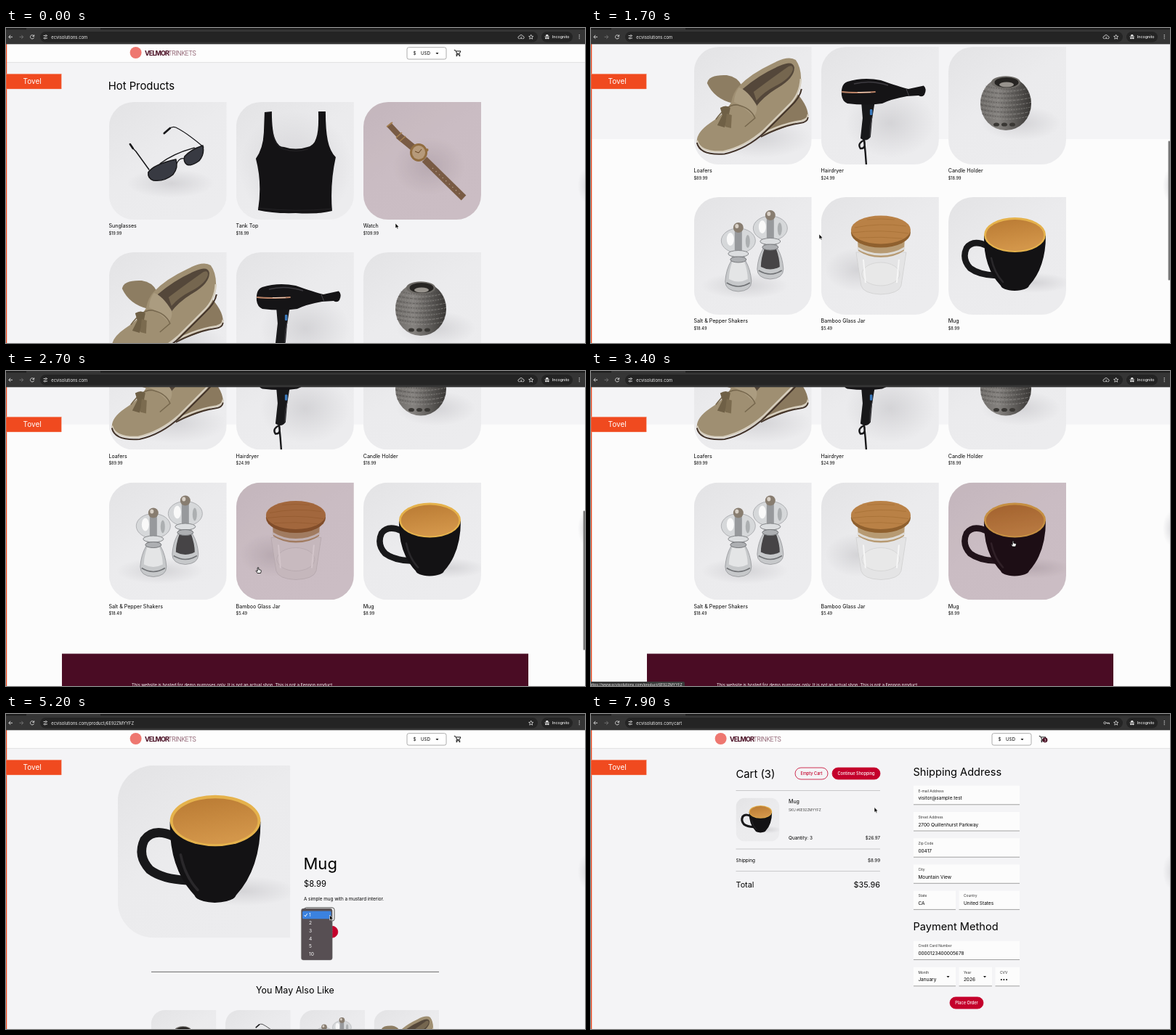
These frames come from a looping animation (797 px wide and 434 px high, 8 s). An HTML page:

```html
<!DOCTYPE html>
<html lang="en">
<head>
<meta charset="utf-8">
<title>Shop walkthrough</title>
<style>
html, body { margin: 0; width: 100%; height: 100%; overflow: hidden; background: #f4f4f6; }
svg { display: block; width: 797px; height: 434px; }
text { font-family: Inter, "Open Sans", sans-serif; white-space: pre; }
</style>
</head>
<body>
<svg id="stage" viewBox="0 0 797 434"></svg>
<script>
const INK = '#111', RED = '#c4002b', ORANGE = '#f04a1f', DARK = '#18181a';
const SITE = 'ecvisolutions.com', MUG_PATH = '/product/6E92ZMYYFZ', JAR_PATH = '/product/9SIQT8TOJO';

// Markup helpers
const text = (x, y, size, s, attrs = '') => `<text x="${x}" y="${y}" font-size="${size}" ${attrs}>${s}</text>`;
const rect = (x, y, w, h, fill, attrs = '') => `<rect x="${x}" y="${y}" width="${w}" height="${h}" fill="${fill}" ${attrs}/>`;
const oval = (x, y, rx, ry, fill, attrs = '') => `<ellipse cx="${x}" cy="${y}" rx="${rx}" ry="${ry}" fill="${fill}" ${attrs}/>`;
const fill = (d, color, attrs = '') => `<path d="${d}" fill="${color}" ${attrs}/>`;
const line = (d, color, width = 1, attrs = '') => `<path d="${d}" fill="none" stroke="${color}" stroke-width="${width}" ${attrs}/>`;
const group = (id, body, attrs = '') => `<g id="${id}" ${attrs}>${body}</g>`;
const caret = (x, y) => fill(`M${x - 2} ${y - 1}h4l-2 2.2z`, INK);
const rule = (x1, x2, y, color) => line(`M${x1} ${y}H${x2}`, color, .8);
const pill = (x, y, w, label, solid = true) =>
  rect(x, y, w, 16, solid ? RED : 'none', `rx="8" stroke="${RED}" stroke-width=".8"`) +
  text(x + w / 2, y + 10, 5.6, label, `text-anchor="middle" font-weight="500" fill="${solid ? '#fff' : RED}"`);
const END = 'text-anchor="end"', ROUND = 'stroke-linecap="round" stroke-linejoin="round"';

// Product pictures, each on a 162 unit square
const shadow = (x, y, rx, ry) => oval(x, y, rx, ry, 'url(#shade)');
const shaker = (x, y, filling) =>
  rect(x - 9, y + 32, 18, 18, '#b2b4b7') +
  fill(`M${x - 10} ${y + 46}Q${x - 17} ${y + 58} ${x - 18} ${y + 74}Q${x - 18} ${y + 87} ${x} ${y + 88}Q${x + 18} ${y + 87} ${x + 18} ${y + 74}Q${x + 17} ${y + 58} ${x + 10} ${y + 46}Z`, '#c6c8ca', 'stroke="#929497" stroke-width=".8"') +
  fill(`M${x - 8} ${y + 46}Q${x - 13} ${y + 60} ${x - 13} ${y + 71}Q${x} ${y + 78} ${x + 13} ${y + 71}Q${x + 13} ${y + 60} ${x + 8} ${y + 46}Z`, filling) +
  line(`M${x - 16} ${y + 76}Q${x} ${y + 86} ${x + 16} ${y + 76}`, '#6f7174', 1.6) +
  oval(x, y + 18, 23.5, 17, '#d6d8da', 'stroke="#a2a4a7" stroke-width=".8"') +
  oval(x - 11, y + 16, 5, 9, '#fff', 'opacity=".85"') + oval(x + 13, y + 19, 3, 9, '#929497', 'opacity=".6"') +
  rect(x - 5, y + 3, 10, 30, '#77797b', 'opacity=".65"') +
  oval(x, y + 36, 14, 4.5, '#dcdee0', 'stroke="#85878a"') + oval(x, y + 44, 11, 4, '#adafb2', 'stroke="#77797c"') +
  oval(x, y, 7, 7, '#887d70') + oval(x - 2, y - 2, 2.5, 3, '#d8d0c6');

const lensEdge = `stroke="${DARK}" stroke-width="1.5"`;
const products = {
  glasses: shadow(85, 112, 60, 20) +
    line('M55 93L37 68Q31 62 29 58', DARK, 1.5, ROUND) + line('M29 58l4 6', DARK, 2.6, ROUND) +
    line('M130 62Q108 43 92 35Q87 33 83 37', DARK, 1.3, ROUND) + line('M84 36l-8 7', DARK, 2.8, ROUND) +
    fill('M54 97Q61 86 92 79Q96 90 88 100Q76 110 61 108Q53 105 54 97Z', '#383a42', lensEdge) +
    fill('M104 75Q113 65 129 60Q132 72 124 81Q113 89 107 86Q102 82 104 75Z', '#383a42', lensEdge) +
    line('M93 85Q97 76 104 78M70 85Q90 70 118 63', DARK, 1.3),
  tank: shadow(82, 90, 78, 78) +
    fill('M39 14L49 13Q49 42 54 52Q58 62 66 62Q82 67 98 62Q107 60 110 50Q114 40 113 13L123 13Q123 38 126 53Q129 68 137 76Q129 112 132 150Q112 155 82 153Q52 154 30 149Q36 112 27 78Q37 64 38 42Z', '#141315') +
    line('M30 146Q82 152 132 147M50 42Q54 62 65 65Q82 70 99 65', '#2c2a2d', .7),
  watch: shadow(90, 88, 50, 40) +
    line('M35 31L49 46', '#85724f', 8) + line('M48 46L70 64', '#85724f', 9.5) +
    line('M84 79L138 132', '#85724f', 9.5) +
    line('M32 34l8-6M45 49l8-7M50 54l8-7', '#bfa15f', 1.6) +
    line('M95 91L133 127', '#d3c5aa', 1.3, 'stroke-dasharray="1.3 5"') +
    oval(76, 69.5, 12, 12.5, '#a4884a') + oval(76, 69.5, 9, 9.5, '#d2c092') +
    line('M76 70l4-5M76 70l-5-2', '#6c5426') + oval(88, 66, 1.5, 2, '#a98a45'),
  loafers: shadow(90, 125, 72, 28) +
    fill('M18 50Q20 38 45 39Q60 41 66 54L54 78Q28 72 18 50Z', '#8d7d62') +
    fill('M136 58Q158 80 157 97Q130 110 94 122L84 106Z', '#8a795e') +
    line('M157 93Q157 100 148 102Q120 106 92 121', '#d6cebe', 2.5) + line('M157 97Q156 104 146 105Q120 109 92 124', '#43342a', 1.8) +
    fill('M62 54Q78 37 108 23Q130 11 140 18Q149 30 147 52Q142 69 130 81L96 116Q70 139 40 145Q10 146 4 131Q3 118 22 105Q44 91 51 77Q54 62 62 54Z', '#9f8f72') +
    line('M4 129Q8 146 40 144.500Q70 138 96 115L130 81Q146 66 147 44', '#d6cebe', 2.5) +
    line('M4 132Q8 150 42 147.500Q72 141 98 117L132 83Q146 70 148 58', '#43342a', 2) +
    fill('M67 58Q90 38 118 26Q136 18 138 28Q139 42 116 56Q96 68 84 84Q72 70 67 58Z', '#54473a') +
    fill('M82 62Q106 44 130 27Q137 24 136 32Q132 44 112 54Q96 62 86 74Z', '#75664f') +
    fill('M62 56Q74 60 86 80Q88 90 82 96Q66 80 55 76Q56 63 62 56Z', '#ab9c80') +
    line('M30 100Q46 78 60 80Q78 84 84 98L70 110', '#77684e', 1.6) +
    fill('M36 84q8-5 14 0l-2 10-6 17-10-3 7-14z', '#6f6046') + fill('M45 92l7 2-1 18-8-2z', '#7b6b4f'),
  dryer: shadow(95, 105, 62, 48) +
    line('M60 128Q49 133 54 140Q62 141 59 128Q61 146 62 162', DARK, 2.4) +
    fill('M55 74L74 74L70 100L68 124Q62 132 54 126L57 98Z', DARK) +
    fill('M28 66Q27 51 36 48Q58 41 82 46Q108 55 120 58L141 53.500Q146 58 142 66Q139 70 134 67L118 68Q96 72 84 78Q62 81 36 78Q29 75 28 66Z', '#151416') +
    line('M117 58l4 10', '#47454a', 1) + line('M45 51Q68 45 92 53', '#3d3b40', 1.5) +
    line('M29 62Q45 64 74 62', '#b98266', 2, ROUND) + line('M50 62.5h18', '#efd0ba', 1.2) +
    rect(67, 86, 3.5, 8, '#3978bb', 'rx="1"') + line('M70 97Q67 110 67 124', '#49474c', 1),
  candle: shadow(100, 105, 55, 24) +
    oval(79, 78, 35, 37, 'url(#metal)') +
    Array.from({length: 14}, (_, i) => {
      const y = 54 + i * 3.2, w = 35 * Math.sqrt(1 - ((y - 78) / 39) ** 2);
      return line(`M${79 - w} ${y}Q79 ${y + 8} ${79 + w} ${y}`, i % 2 ? '#a19e9b' : '#403e3c', 1, `stroke-dasharray="${2 + i % 3} 1.5" opacity=".55"`);
    }).join('') +
    [66, 77, 88].map(x => oval(x, 107, 4, 2.6, '#393734')).join('') +
    oval(79, 49, 20, 8.8, '#6d6a66') + oval(80, 49, 16.5, 7, '#262422') + oval(80, 52, 10, 3.5, '#97938d'),
  shakers: shadow(70, 122, 60, 18) + shaker(105, 25, '#464446') + shaker(61, 42, '#e4e5e6'),
  jar: shadow(50, 100, 45, 30) +
    fill('M48 76L55 122Q58 133 82 134Q107 133 110 122L117 76Z', '#e4e4e5', 'stroke="#d0d0d0" stroke-width=".8"') +
    oval(82, 106, 26, 16, '#e8e8e8', 'stroke="#d2d2d2" stroke-width=".8"') + line('M58 86l3 32M107 86l-3 32', '#f6f6f6', 2) +
    fill('M50 58L51 74Q64 83 82 83Q101 83 114 74L115 58Z', '#b79a72') + line('M50 70Q64 79 82 79Q101 79 115 70', '#dedbd6', 3) +
    oval(82, 49, 41, 20.5, '#8f602e') + oval(82, 45, 41, 19.5, '#b98146') +
    line('M46 42Q80 35 117 40M43 49Q80 44 120 50M52 56Q82 54 112 57M63 31Q82 29 101 31', '#a87137', .8),
  mug: shadow(118, 118, 50, 14) +
    line('M53 67Q34 58 25 70Q18 85 30 98Q42 107 65 108', DARK, 8.5) +
    fill('M49 53Q48 97 72 122Q74 128 91 129Q109 128 111 122Q134 97 134 53Z', '#131214') +
    line('M59 84Q63 104 75 117', '#343236', 2.5, ROUND + ' opacity=".7"') +
    oval(91.5, 52, 42.5, 24, '#e5b24c') + oval(91.5, 52.5, 39.8, 21.5, 'url(#mustard)')
};

const photo = (name, x, y, size, clip = 'card') =>
  `<g transform="translate(${x} ${y}) scale(${size / 162})" clip-path="url(#${clip})">${rect(0, 0, 162, 162, 'url(#wall)')}${products[name]}</g>`;

const defs = `<defs>
<linearGradient id="wall" x2=".7" y2="1"><stop stop-color="#e3e3e5"/><stop offset=".5" stop-color="#ebebed"/><stop offset="1" stop-color="#ececee"/></linearGradient>
<radialGradient id="shade"><stop stop-color="#77757c" stop-opacity=".2"/><stop offset="1" stop-color="#77757c" stop-opacity="0"/></radialGradient>
<radialGradient id="edge"><stop stop-color="#dddde0"/><stop offset="1" stop-color="#dddde0" stop-opacity="0"/></radialGradient>
<linearGradient id="metal"><stop stop-color="#6f6c69"/><stop offset=".35" stop-color="#85827f"/><stop offset="1" stop-color="#383634"/></linearGradient>
<linearGradient id="mustard" x2=".3" y2="1"><stop stop-color="#b97a33"/><stop offset="1" stop-color="#d3964a"/></linearGradient>
<clipPath id="card"><path d="M34 0H162V128A34 34 0 0 1 128 162H34A34 34 0 0 1 0 128V34A34 34 0 0 1 34 0Z"/></clipPath>
<clipPath id="half"><path d="M34 0H162V162H34A34 34 0 0 1 0 128V34A34 34 0 0 1 34 0Z"/></clipPath>
<clipPath id="round"><rect width="162" height="162" rx="34"/></clipPath>
<clipPath id="view"><rect y="22" width="797" height="412"/></clipPath></defs>`;

const cartIcon = line('M616.8 30.5h1.6l2.6 4.8h3.2l1.7-3.4h-6.4M620.6 35.3l-.8 1.5h5.4', INK, 1) + oval(620.4, 38.2, .9, .9, INK) + oval(624.4, 38.2, .9, .9, INK);
const shopHeader = rect(0, 22, 797, 25, '#fdfdfd') + rule(0, 797, 47.4, '#dcdcde') +
  oval(178.6, 34, 8, 8, '#ee7770') +
  text(191, 38, 9, 'VELMOR', 'font-weight="700" letter-spacing="-.9" fill="#470b20"') +
  text(223, 38, 9, 'TRINKETS', 'font-weight="300" letter-spacing="-.6" fill="#7c4658"') +
  rect(552, 26.7, 54, 16.3, '#fff', 'rx="2.5" stroke="#999" stroke-width=".8"') +
  text(560.5, 37.2, 6.2, '$') + text(571, 37.2, 6.2, 'USD') + caret(593.5, 35) + cartIcon +
  group('badge', oval(625, 35.8, 3.4, 3.4, '#470b20') + text(625, 37.6, 5, '3', 'fill="#fff" text-anchor="middle"'));

const catalog = [
  ['glasses', 'Sunglasses', 19.99], ['tank', 'Tank Top', 18.99], ['watch', 'Watch', 109.99],
  ['loafers', 'Loafers', 89.99], ['dryer', 'Hairdryer', 24.99], ['candle', 'Candle Holder', 18.99],
  ['shakers', 'Salt &amp; Pepper Shakers', 18.49], ['jar', 'Bamboo Glass Jar', 5.49], ['mug', 'Mug', 8.99]
];
const homePage = rect(0, 436, 797, 500, '#fcfcfc') + text(140.8, 84.9, 14.8, 'Hot Products') +
  catalog.map(([name, label, price], i) => {
    const x = 141.8 + i % 3 * 175.1, y = 102 + Math.floor(i / 3) * 207;
    return photo(name, x, y, 162) +
      `<g transform="translate(${x} ${y})">` +
      rect(0, 0, 162, 162, '#47001d', `id="tint-${name}" opacity=".2" clip-path="url(#card)"`) +
      text(-.3, 173, 7.1, label) + text(-.3, 182.6, 5.6, '$' + price) + '</g>';
  }).join('') +
  rect(77, 752, 642, 200, '#4a0c24') +
  text(173, 797, 5.85, 'This website is hosted for demo purposes only. It is not an actual shop. This is not a Fennop product.', 'fill="#fff"');

const productPage = photo('mug', 153.8, 70.7, 237.7, 'half') +
  text(409.5, 213.5, 22, 'Mug') + text(410, 238.3, 11.2, '$8.99') +
  text(410, 257, 6.3, 'A simple mug with a mustard interior.') +
  rect(410.4, 266.8, 41.6, 18.4, '#fdfdfd', 'id="select" rx="3" stroke="#999" stroke-width=".8"') +
  text(417, 278.5, 6.4, '1', 'id="quantity"') + caret(439.5, 276) +
  pill(410.4, 292.2, 46.4, 'Add To Cart') + rule(200, 596, 355.3, '#444') +
  text(398, 384.8, 12.5, 'You May Also Like', 'text-anchor="middle"') +
  ['candle', 'glasses', 'shakers', 'loafers'].map((name, i) => photo(name, 199.8 + i * 102.2, 408, 89.8)).join('') +
  group('menu', rect(406.4, 268, 42.8, 71, '#574f53', 'rx="3" stroke="#777" stroke-width=".4"') +
    rect(408, 271.4, 39.6, 10.8, '#3b82e0', 'id="row" rx="1.5"') +
    line('M410.6 277l1.5 2 2.6-4', '#fff', .9) +
    [1, 2, 3, 4, 5, 10].map((n, i) => text(417, 279.2 + i * 10.8, 6.6, n, 'fill="#fff"')).join(''));

const field = (x, y, w, label, value) => rect(x, y, w, 26, '#fcfcfc') + rule(x, x + w, y + 26, '#8b8b8b') +
  text(x + 6.4, y + 8.8, 4.9, label, 'fill="#333"') + text(x + 6.4, y + 19.5, 6.5, value);
const cartPage = text(199.5, 88.3, 14.8, 'Cart (3)') + pill(281, 74, 45, 'Empty Cart', false) + pill(332, 74, 66, 'Continue Shopping') +
  [105.5, 186, 216.6].map(y => rule(199.5, 398, y, '#bcbcbe')).join('') + photo('mug', 199.5, 115.6, 60, 'round') +
  text(272, 122.5, 7.1, 'Mug') + text(272, 133.8, 4.7, 'SKU #6E92ZMYYFZ', 'fill="#444"') +
  text(272, 173, 6.4, 'Quantity: 3') + text(398, 173, 6.2, '$26.97', END) +
  text(199.5, 203.5, 6.4, 'Shipping') + text(398, 203.5, 6.2, '$8.99', END) +
  text(199.5, 239.2, 10.8, 'Total') + text(398, 239.2, 10.9, '$35.96', END) +
  text(443.5, 85, 14.6, 'Shipping Address') + text(443.5, 298.4, 14.6, 'Payment Method') +
  field(444, 98.8, 146, 'E-mail Address', 'visitor@sample.test') +
  field(444, 135, 146, 'Street Address', '2700 Quillenhurst Parkway') +
  field(444, 171.2, 146, 'Zip Code', '00417') + field(444, 207.3, 146, 'City', 'Mountain View') +
  field(444, 243.4, 58, 'State', 'CA') + field(506.5, 243.4, 83.5, 'Country', 'United States') +
  field(444, 312.5, 146, 'Credit Card Number', '0000123400005678') +
  field(444, 348.8, 58, 'Month', 'January') + field(506.5, 348.8, 45.5, 'Year', '2026') + field(556.5, 348.8, 33.5, 'CVV', '•••') +
  caret(491.5, 362) + caret(542, 362) + pill(494, 390, 46, 'Place Order');

const LIGHT = '#dedede', LIGHT_EDGE = `stroke="${LIGHT}" stroke-width=".8"`;
const browserBar = rect(0, 0, 797, 22.3, '#353535') + rect(130, 0, 667, 2.2, '#1d1d1d') + rect(0, 0, 28, 2.2, '#1d1d1d') +
  rect(47, 5, 685, 14.6, '#242424', 'rx="7.3"') + rect(737, 5, 43, 14.6, '#242424', 'rx="7.3"') +
  line('M9 12.3H4M6.2 9.8L3.8 12.3l2.4 2.5', LIGHT, .9) + line('M18.5 12.3h5M21.3 9.8l2.4 2.5-2.4 2.5', '#777', .9) +
  line('M38.3 11a2.6 2.6 0 1 0 .2 2.2M38.7 9.3v2.2h-2.2', LIGHT, .9) +
  line('M51.5 10.6h2.5M56 10.6h1M51.5 14h1M54.5 14h2.5', LIGHT, .9) + oval(55, 10.6, 1, 1, 'none', LIGHT_EDGE) + oval(53.5, 14, 1, 1, 'none', LIGHT_EDGE) +
  text(62.3, 14.5, 5.85, '', 'id="url" fill="#eee"') +
  group('cloud', line('M707.5 14.7h-1a1.7 1.7 0 0 1 .3-3.4a2.3 2.3 0 0 1 4.5 0a1.7 1.7 0 0 1 .4 3.4h-1M709.2 11.8v3.2l-1.2-1.2M709.2 15l1.2-1.2', LIGHT, .8)) +
  group('key', oval(707.3, 12.3, 1.5, 1.5, 'none', LIGHT_EDGE) + line('M709 12.3h4.5v1.8M711.5 12.3v1.5', LIGHT, .9)) +
  line('M722.7 9.2l.9 2.1 2.2.2-1.7 1.5.5 2.2-1.9-1.2-1.9 1.2.5-2.2-1.7-1.5 2.2-.2z', LIGHT, .8) +
  fill('M742.8 11.2l.8-2.2h2.4l.8 2.2zM741.5 11.5h6.6v.7h-6.6z', LIGHT) + oval(743.4, 14, 1.3, 1.3, LIGHT) + oval(746.3, 14, 1.3, 1.3, LIGHT) +
  text(751.8, 14.3, 5.3, 'Incognito', 'font-weight="500" fill="#eee"') +
  [9.8, 12.2, 14.6].map(y => oval(789.2, y, .7, .7, LIGHT)).join('');

const stage = document.getElementById('stage');
stage.innerHTML = defs + rect(0, 0, 797, 434, '#f4f4f6') +
  `<g clip-path="url(#view)">${group('scroller', group('home', homePage) + shopHeader)}${group('product', productPage)}${group('cart', cartPage)}</g>` +
  oval(799, 217, 12, 24, 'url(#edge)') + rect(794.6, 24, 2.4, 192, '#777', 'id="bar" rx="1.2"') +
  rect(0, 22, 1.2, 412, ORANGE) + rect(0, 63.3, 76.3, 20.7, ORANGE, 'stroke="#f9a58f" stroke-width=".7" stroke-dasharray="1 1"') +
  text(23.5, 77, 10, 'Tovel', 'fill="#fff"') +
  group('status', rect(-3, 428, 132, 9, '#393939', 'rx="2"') + text(-2, 433.6, 5, '', 'id="link" fill="#eee"')) +
  browserBar +
  group('arrow', fill('M0 0V7L1.6 5.6 2.7 8 3.9 7.5 2.9 5.2H5Z', '#000', 'stroke="#fff" stroke-width=".6"')) +
  group('hand', fill('M-.8 0Q0-1 .8 0V2.6L3.8 3.3Q4.5 3.8 4.2 5L3.5 7.5H-.9L-2.8 4.6Q-2.6 3.6-1.7 4.2L-.8 5Z', '#fff', 'stroke="#000" stroke-width=".8"'));

// Motion
const cursorKeys = [[0, 536, 269], [200, 536, 269], [700, 440, 238], [1200, 330, 258], [1400, 314, 284], [1900, 314, 284],
  [2500, 347, 271], [2800, 347, 271], [3300, 581, 234.5], [4500, 581, 234.5], [5000, 445.5, 277], [5300, 445.5, 277],
  [5700, 430, 297], [5950, 430, 297], [6300, 434, 300], [7100, 434, 300], [7800, 390, 128.5]];
const scrollKeys = [[0, 0], [900, 0], [1000, .5], [1400, .5], [1700, 283], [2000, 338], [2500, 362.5]];
function track(keys, t) {
  const i = keys.findIndex(k => k[0] > t);
  if (i < 0) return keys[keys.length - 1].slice(1);
  const a = keys[i - 1], b = keys[i], p = (t - a[0]) / (b[0] - a[0]), e = p * p * (3 - 2 * p);
  return a.slice(1).map((v, n) => v + (b[n + 1] - v) * e);
}

const el = id => document.getElementById(id);
const show = (id, on) => el(id).setAttribute('display', on ? 'inline' : 'none');
const hovers = {watch: [0, 200], tank: [500, 1450], jar: [2400, 3000], mug: [3100, 3700]};

function draw(now) {
  const t = Math.floor(now % 8000 / 100) * 100;
  const within = (a, b) => t >= a && t < b;
  const home = t < 3700, cart = t >= 6900;
  const [x, y] = track(cursorKeys, t), scroll = home ? track(scrollKeys, t)[0] : 0;

  show('home', home);
  show('product', !home && !cart);
  show('cart', cart);
  show('badge', cart);
  show('cloud', home);
  show('key', t >= 7400);
  el('url').textContent = SITE + (home ? '' : cart ? '/cart' : MUG_PATH);
  el('scroller').setAttribute('transform', `translate(0 ${-scroll})`);
  for (const [name] of catalog) show('tint-' + name, within(...(hovers[name] || [0, 0])));

  show('bar', within(1500, 3200));
  el('bar').setAttribute('y', 24 + scroll * .465);
  show('status', within(2800, 4100));
  el('link').textContent = 'https://www.' + SITE + (t < 3100 ? JAR_PATH : MUG_PATH);

  show('menu', within(5100, 5900));
  el('row').setAttribute('y', 271.4 + 10.8 * Math.max(0, Math.floor((y - 271) / 10.8)));
  el('select').setAttribute('stroke', within(5100, 6400) ? '#222' : '#999');
  el('quantity').textContent = t < 5900 ? '1' : '3';

  const pointing = within(...hovers.jar) || within(...hovers.mug) || within(6100, 6900);
  show('hand', pointing);
  show('arrow', !pointing);
  el(pointing ? 'hand' : 'arrow').setAttribute('transform', `translate(${x} ${y})`);
}

const start = performance.now();
function loop() {
  draw(performance.now() - start);
  requestAnimationFrame(loop);
}
loop();
</script>
</body>
</html>
```
